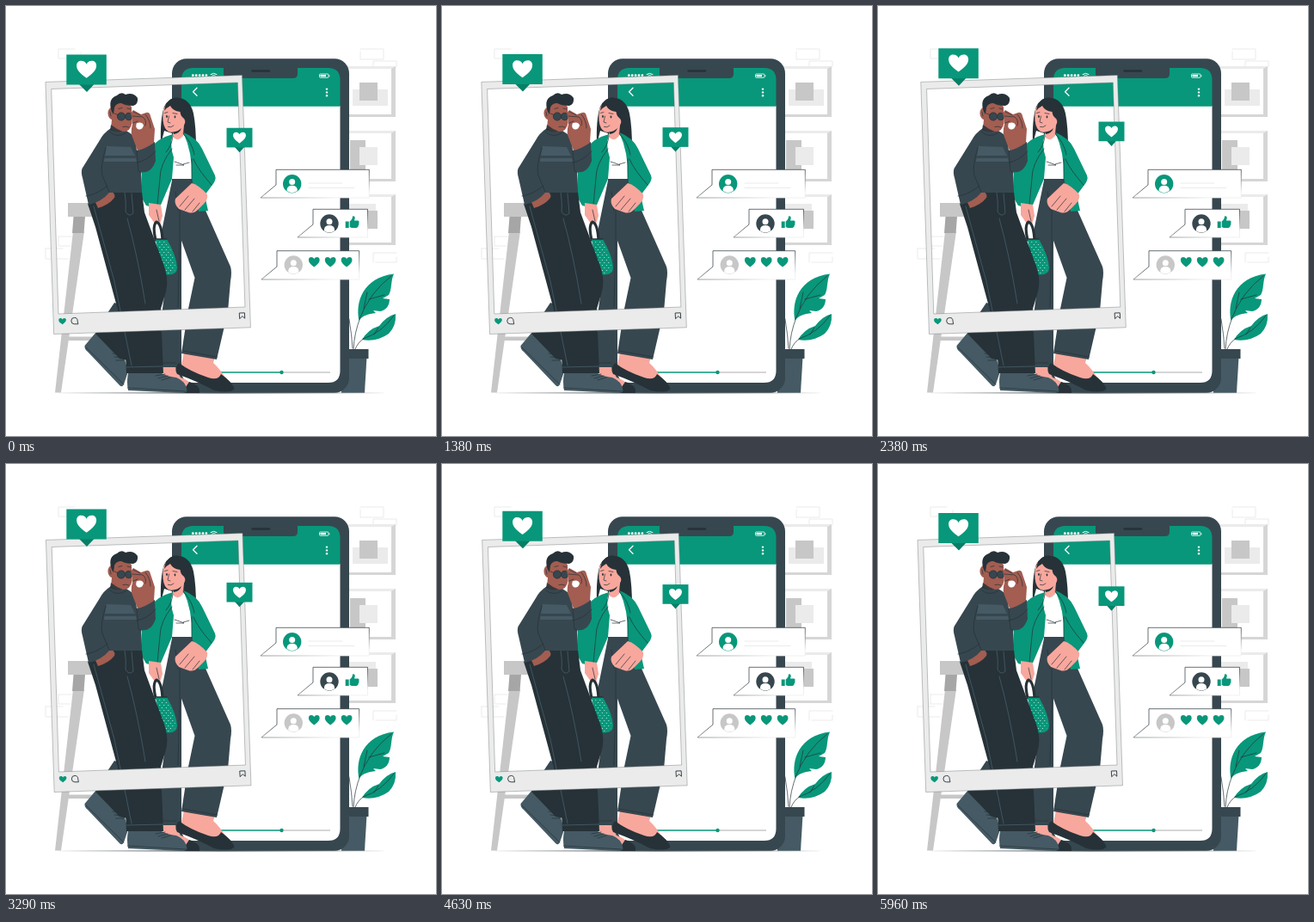
An HTML page that plays this animation: 500x500 px, repeating every 6 s.

```html
<!DOCTYPE html>
<html lang="en">
<head>
<meta charset="utf-8">
<title>Photo sharing</title>
<style>
  html, body { margin: 0; width: 100%; height: 100%; overflow: hidden; background: #fff; }
  svg { display: block; width: 100%; height: 100%; }
  .green { fill: #08977a; }
  .slate { fill: #37474f; }
  .steel { fill: #455a64; }
  .ink { fill: #263238; }
  .brown { fill: #a35d51; }
  .skin { fill: #f8a79d; }
  .white { fill: #fff; }
  .pale { fill: #ebebeb; }
  .grey { fill: #c7c7c7; }
  .line { fill: none; stroke: #263238; stroke-width: .7; stroke-linecap: round; stroke-linejoin: round; }
  .seam { stroke: #455a64; stroke-width: .9; }
  .fade { stroke: #e3e3e3; }
  .bubble { fill: #fff; stroke: url(#edge); stroke-width: .7; }
</style>
</head>
<body>
<svg viewBox="0 0 500 500" xmlns="http://www.w3.org/2000/svg">
  <defs>
    <path id="heart" d="M0 10C-7 5-12 1-12-4.5C-12-8-9.5-10-6.5-10C-3.5-10-1-8.5 0-6C1-8.5 3.5-10 6.5-10C9.5-10 12-8 12-4.5C12 1 7 5 0 10Z"/>
    <g id="person" class="white">
      <circle cy="-2.300" r="3.500"/>
      <path d="M-6 8.400V6.500Q-5.500 2 0 2Q5.500 2 6 6.500V8.400Q0 12.500-6 8.400Z"/>
    </g>
    <g id="picture">
      <path class="pale" d="M396 0H453V59H396Z"/>
      <path fill="#d6d6d6" d="M448 3L453 0V59L448 56ZM396 56H448L453 59H396Z"/>
      <path class="white" d="M396 3H448V56H396Z"/>
    </g>
    <pattern id="dots" width="5" height="6" patternUnits="userSpaceOnUse">
      <circle cx="1.300" cy="1.500" r=".5" fill="#fff"/>
      <circle cx="3.800" cy="4.500" r=".5" fill="#fff"/>
    </pattern>
    <linearGradient id="edge" x1=".5" y1=".4" x2=".85" y2=".9">
      <stop offset="0" stop-color="#263238"/>
      <stop offset="1" stop-color="#ebebeb"/>
    </linearGradient>
  </defs>

  <!-- wall -->
  <g class="line fade">
    <path d="M87 54V61H61V50H80M412 53V62H439V50H412M427 70V64H454V71M76 268H61V279H74M46 282V294H72M46 282H66M427 298V287H454M430 298H454V292"/>
  </g>
  <use href="#picture" y="70"/>
  <use href="#picture" y="145"/>
  <use href="#picture" y="219"/>
  <path class="pale" d="M403 97H444V116H403ZM398 230H430V250H398Z"/>
  <path class="grey" d="M411 89H432V110H411ZM400 156H418V192H400ZM414 238H432V259H414Z"/>
  <path class="pale" d="M411 164H432V185H411Z"/>

  <path class="ink" d="M52 450L250 449.300L448 450L250 450.400Z"/>

  <!-- plant -->
  <path class="steel" d="M389 408H419.500L417 449.700H390Z"/>
  <path class="slate" d="M388 399H421.500V410H388Z"/>
  <path class="line" d="M404 399Q405 380 412 362M406 399Q409 391 417 386M403 398Q402 382 399 364"/>
  <path class="green" d="M410.500 366C406 344 415 316 451 311.500C447 320 449 330 445 336L438 340L446 341C446 349 441 354 435 355L427 354L430 357C421 358 414 360 410.500 366Z"/>
  <path class="green" d="M414 388Q421 376 434 372Q442 361 453 358Q454 372 445 381Q431 391 414 388Z"/>
  <path class="line" d="M411 364Q423 333 448 314M416 352L420 333M422 341L440 336M415 387Q437 380 451 360M428 382L433 374"/>

  <!-- phone -->
  <rect class="slate" x="193" y="61.300" width="206" height="388.400" rx="17"/>
  <path class="white" d="M204 116H388.500V424Q388.500 438 374.500 438H218Q204 438 204 424Z"/>
  <path class="green" d="M204 116.700V86Q204 72 218 72H253V79Q253 84 258 84H334Q339 84 339 79V72H374.500Q388.500 72 388.500 86V116.700Z"/>
  <path class="line" style="stroke-width:2.400" d="M286.500 75.500H306"/>
  <g class="white" id="signal"></g>
  <path class="line" style="stroke:#fff;stroke-width:1" d="M238 79.500Q241.500 77 245 79.500M239.500 81.200Q241.500 79.800 243.500 81.200"/>
  <rect x="364.500" y="79" width="10.500" height="4.300" rx="1" fill="none" stroke="#fff" stroke-width=".8"/>
  <path class="white" d="M365.500 80H372V82.300H365.500ZM375.500 80.200H376.300V82.200H375.500Z"/>
  <path class="line" style="stroke:#fff;stroke-width:1.300" d="M222 95.200L217.500 99.700L222 104.200"/>
  <g class="white"><circle cx="373" cy="96.600" r="1.200"/><circle cx="373" cy="100.400" r="1.200"/><circle cx="373" cy="104.200" r="1.200"/></g>
  <path stroke="#c7c7c7" stroke-width="1.500" d="M320 426H377"/>
  <path stroke="#08977a" stroke-width="1.700" d="M217 426H320"/>
  <circle class="green" cx="320.500" cy="426" r="2.200"/>

  <!-- messages -->
  <path class="bubble" d="M296 223L314 208V190.300H422.300V223Z"/>
  <path class="line fade" d="M352 206H391M352 211.500H405"/>
  <circle class="green" cx="332.700" cy="206.700" r="10.700"/>
  <use href="#person" x="332.700" y="206.700"/>

  <path class="bubble" d="M339 269L357 254V236.300H420.500V269Z"/>
  <circle class="slate" cx="376" cy="253" r="10.700"/>
  <use href="#person" x="376" y="253"/>
  <path class="green" d="M394.700 250.500H398.700V258H394.700ZM399.700 250.500Q403 248 403 244.500Q405.500 243.500 405.800 246.500L405 249.500H409.500Q411.500 250.500 410.300 252.500Q411 254 409.800 255Q409.800 257.800 407.500 258H402L399.700 257Z"/>

  <path class="bubble" d="M297 318L315 303V284.700H410.700V318Z"/>
  <circle class="grey" cx="334.300" cy="301" r="10.700"/>
  <use href="#person" x="334.300" y="301"/>
  <g class="green" id="likes"></g>

  <!-- stool -->
  <path class="grey" d="M72 229H125V245H72Z"/>
  <path class="grey" d="M70 384.500H118V389H70ZM78 262H91L64 449.500H57Z"/>
  <path fill="#a6a6a6" d="M78.500 245H92L90.500 264H77Z"/>

  <!-- woman -->
  <g>
    <path class="ink" d="M198 106.500Q214 107 218 125Q221 140 221 166L205 152L184 145L180 161Q179 131 184 117Q189 107 198 106.500Z"/>
    <path class="skin" d="M182 420H197L203 432Q213 435 217 442L207 446L184 434Z"/>
    <path class="ink" d="M213 437Q223 440 225 446V450H206L209 443Z"/>
    <path class="skin" d="M207 403L243 408L241 415Q249 422 256 434L238 438L203 422Z"/>
    <path class="ink" d="M201 415Q195 422 199 428Q224 437 242 447Q262 451 265.500 445Q263 437 250 428Q247 436 235 432Q214 425 201 415Z"/>
    <path class="slate" d="M194 198H217L233 240L261 303Q263 309 261 320L258 355L245 411L204 404L212 352L219.500 316L203 270L201.500 335L197.500 420H179L182 352L186 320L181 262Z"/>
    <path class="line" d="M202 236V270L200 350M197 216L200 238M205 401L245.500 408M180 415H197.500"/>
    <path class="white" d="M191 151L205 147L214 158L217 201H192Z"/>
    <path class="line" d="M196 181L202 183L207 185H198M206 184L213 182"/>
    <path class="skin" d="M183 120Q181 135 185 142Q189 148 194 146.500V152Q199 159 206 151L207 139Q212 133 208 128L202 115H186Z"/>
    <path class="ink" d="M184 122Q186 107 199 106.500Q214 110 216 130Q217 148 220 160L206.500 150L207 139Q210 133 206 130Q203 128 202.500 123Q194 122 191 116Q187 118 184 122Z"/>
    <path class="line" d="M184.500 124.500L188 123.500M194 124.500L199 125.500M189.500 128L188 135L191 136M188.500 140.500Q192 142 195 139"/>
    <g class="ink"><ellipse cx="187" cy="128.500" rx=".9" ry="1.400"/><ellipse cx="196.500" cy="129" rx=".9" ry="1.400"/></g>
    <path class="ink" d="M194 146.500Q200 146 204 142Q202 148 195 149Z"/>
    <path class="green" d="M194 149Q175 154 167 167L158 190L156.500 221L163 232L178 236L193 201L195 176Q190 162 194 149Z"/>
    <path class="green" d="M206 147Q222 153 228 166L243 197Q245 202 240 208L231 220L235 238L224 239L216 200Q217 170 206 147Z"/>
    <path class="line" d="M194 151Q193 162 186 170M206 148Q217 160 219 173M193 166Q179 184 179 200L176 231M218 178Q223 190 239 208M216 178V203"/>
    <path class="skin" d="M216 206Q224 208 234 219Q235 225 230 230L223 237Q218 242 212 240L201 236Q195 230 197 224Z"/>
    <path class="line" d="M212 221L202 233M219 224L208 237M225 229L217 239"/>
    <path class="skin" d="M166 229L180 231L182 244L179 254L173 253L166 243Z"/>
    <path class="line" d="M175 237L178 250"/>
    <path class="line" style="stroke-width:3.200" d="M174 272Q170 255 175 251Q181 253 182 273"/>
    <path class="green" d="M174 271H187Q198 290 199 304Q199 312 190 312.500H181Z"/>
    <path fill="url(#dots)" d="M176 273H186Q196 290 197 304Q197 310 190 311H182Z"/>
    <path class="line" style="stroke-width:1.500" d="M175 271H187"/>
  </g>

  <!-- man -->
  <g>
    <path class="steel" d="M105 379L91.500 395Q91 399 95 402L132 441Q135 444 137 440L142 425L137 407Z"/>
    <path class="line" d="M93 397L137 440M124 404L133 405M126 408L135 409M128 412L137 412"/>
    <path class="ink" d="M130 352L126 360L104 381L132 410L150 414V352Z"/>
    <path class="slate" d="M126 345L118 357H131L129 346Z"/>
    <path class="steel" d="M142 427H181Q188 431 198 432Q209 436 210.500 447Q210 450 205 450L142 447Q140 437 142 427Z"/>
    <path class="line" d="M141.500 444L209 448M174 430L185 428M177 433L188 430M181 435L191 432"/>
    <path class="ink" d="M95 230L122 216H158L161 240L182 297Q190 316 186 332L180 352L181 380L183 427H140L138 385L131 357L104 257Z"/>
    <path class="line seam" d="M102 233L126 320L146 418M138 217Q140 230 139 239Q143 246 148 241L146 218M141 247Q153 290 162 346M140 420L183 419"/>
    <path class="brown" d="M103 226L122 215Q128 219 126 223Q120 231 107 235Z"/>
    <path class="slate" d="M122 142Q113 148 109 156L88.500 189Q87 193 89 200L96 231Q111 228 120 217H158L157 193Q169 195 174 180L173 158Q162 163 152 168Q151 154 146 149L137 143Z"/>
    <path class="steel" d="M117 163L145 164L150 174H115Z"/>
    <path class="steel" d="M114.500 177H151L152 181H114Z"/>
    <path class="line" d="M116 165Q109 188 112 197L120 216M93 221Q106 219 118 209M152 168L154 192L158 194M120 146Q128 154 139 148M152 182Q164 180 174 169"/>
    <path class="brown" d="M122 118Q117 121 119 128Q121 132 123 132L122 142Q128 148 136 146Q145 146 146.500 136L146 117L138 110H126Z"/>
    <path class="ink" d="M122 120Q119 107 129 104Q134 99 139 103Q148 100 153 107Q154 114 148 116Q139 116 134 113Q128 113 126 118L125 126L123 123Z"/>
    <path class="ink" opacity=".85" d="M122 138Q128 143 136 146Q130 148 121 144Z"/>
    <path class="line" d="M131 119.500L135 118.500M141 119L145 120M136 140.500Q140 139.500 143 141M121 123L122 128"/>
    <g fill="#37474f" stroke="#263238" stroke-width=".8">
      <circle cx="134" cy="128.500" r="4.600"/><circle cx="142.700" cy="128.500" r="4.200"/>
    </g>
    <path class="line" d="M126 125L130 126.500"/>
    <path class="brown" d="M146 128Q144 125 148 121L157 126L163 124Q167 123 168 128L173 143L172 159Q162 166 153 168L148 155Q144 147 147 138Z"/>
    <path class="white" d="M152 136Q159 134 160 139Q158 145 153 143Q150 141 152 136Z"/>
    <path class="line" d="M147 128L159 129Q164 133 162 139M148 136L153 134M162 126Q168 133 168 142M148 123L156 127"/>
  </g>

  <!-- photo card -->
  <g id="card">
    <path fill="#ebebeb" fill-rule="evenodd" stroke="#70777a" stroke-width=".45" d="M46 88.400L274.600 80.500L284.500 373.800L55.700 381.500ZM52.800 96.500L269.500 89L278 350L61 358Z"/>
    <use href="#heart" class="green" transform="translate(65.700 366.600) rotate(-2) scale(.36)"/>
    <path class="line" style="stroke-width:.9" d="M83.500 369.800H79.500A3.700 3.700 0 1 1 83.300 366Z"/>
    <path class="line" style="stroke-width:.9" d="M271.700 357L277.500 356.800L277.800 363.200L274.900 360.700L272 363.400Z"/>
  </g>

  <!-- badges -->
  <g class="badge">
    <path fill="#067f67" d="M84.500 91H103L94 100.500Z"/>
    <path class="green" d="M70.300 57H116.800V92H70.300Z"/>
    <use href="#heart" class="white" transform="translate(93.600 74.300) scale(.96 1)"/>
  </g>
  <g class="badge">
    <path fill="#067f67" d="M265.500 164H277.500L271.500 170.700Z"/>
    <path class="green" d="M256.500 142.300H286.500V165H256.500Z"/>
    <use href="#heart" class="white" transform="translate(271.500 153.800) scale(.62 .65)"/>
  </g>
</svg>
<script>
  const LOOP = 6000, FLOAT = 1500, FRAME = 1000 / 24;
  const SHAKE = [0, -1, 2, -4, 4, -4, 4, -4, 2, -1, 0]; // x offset at every tenth of the loop
  const byId = id => document.getElementById(id);
  const card = byId('card');
  const badges = document.querySelectorAll('.badge');

  byId('signal').innerHTML = [0, 1, 2, 3, 4]
    .map(i => `<circle cx="${217.3 + i * 3.9}" cy="80.700" r="1.400"/>`).join('');
  byId('likes').innerHTML = [358.3, 377.2, 396.1]
    .map(x => `<use href="#heart" transform="translate(${x} 297.800) scale(.53 .58)"/>`).join('');

  function shakeAt(t) {
    const pos = t / LOOP * 10;
    const i = Math.min(9, Math.floor(pos));
    return SHAKE[i] + (SHAKE[i + 1] - SHAKE[i]) * (pos - i);
  }

  function floatAt(t) {
    const p = t % FLOAT / FLOAT;
    return -10 * (1 - Math.abs(2 * p - 1));
  }

  // Motion advances in 24 steps per second.
  function render(ms) {
    const t = (Math.floor((ms + 5) / FRAME) + 1) * FRAME % LOOP;
    card.setAttribute('transform', `translate(${shakeAt(t)} 0)`);
    badges.forEach(b => b.setAttribute('transform', `translate(0 ${floatAt(t)})`));
  }

  const start = performance.now();
  function tick() {
    render(performance.now() - start);
    requestAnimationFrame(tick);
  }
  tick();
</script>
</body>
</html>
```
